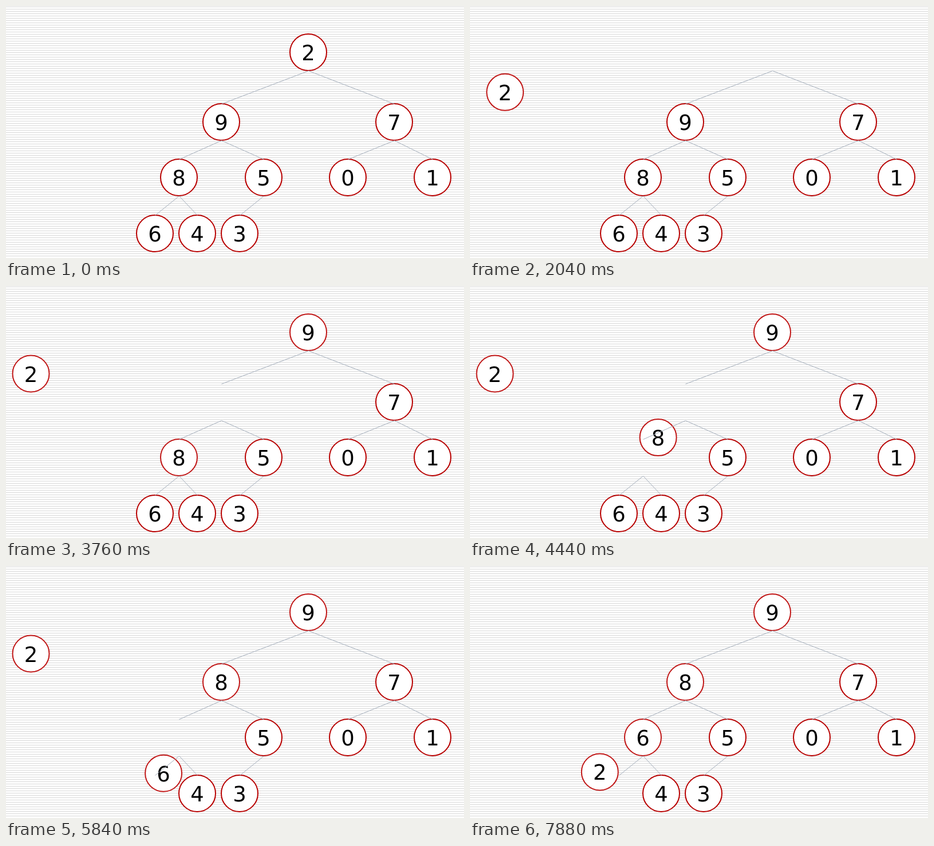
Recreate the animation shown at these times as an HTML page. Size 800 by 441 pixels, loop 8 s.

```html
<!DOCTYPE html>
<html lang="en">
<head>
<meta charset="utf-8">
<title>Heap sift-down</title>
<style>
  html, body { margin: 0; width: 100%; height: 100%; overflow: hidden; background: #fff; }
  svg { display: block; width: 100%; height: 100%; }
  circle { fill: #fff; stroke: #b80000; stroke-width: 2; }
  .moved circle { stroke: #c01616; }
  text {
    font: 37px Verdana, "DejaVu Sans", sans-serif; text-anchor: middle;
    text-rendering: geometricPrecision; fill: #000;
  }
  line { stroke: #a5afbc; stroke-width: 1; }
</style>
</head>
<body>
<svg viewBox="0 0 800 441">
  <defs>
    <pattern id="rules" width="8" height="4" patternUnits="userSpaceOnUse">
      <rect y="1" width="8" height="1" fill="#d8d8d8"/>
    </pattern>
  </defs>
  <rect width="800" height="441" fill="url(#rules)"/>
  <g id="nodes"></g>
  <g id="edges"></g>
</svg>
<script>
const LOOP = 8000;
const FRAME = 40;         // time grid on which the picture may change
const BEAT = 343.2;       // spacing of the visible steps
const FIRST_BEAT = 693.2;
const R = 32;

// Heap in array order: slot i has children 2i+1 and 2i+2
const values = [2, 9, 7, 8, 5, 0, 1, 6, 4, 3];
const columns = [528, 376, 678, 302, 450, 597, 745, 260, 334, 408];
const rows = [81, 203, 300, 398];
const slots = columns.map((x, i) => [x, rows[Math.floor(Math.log2(i + 1))]]);
const aside = [43.5, 153.5];

const swing = p => (1 - Math.cos(Math.PI * p)) / 2;
const surge = p => p * p * (1.88 - 0.88 * p);

// The root steps aside, larger children rise one by one, then it drops in.
// Start and length are in beats.
const legs = [{ value: 2, to: aside, start: -0.3, length: 4.9, ease: swing }];
[9, 8, 6].forEach((value, i) => {
  legs.push({ value, to: slots[2 ** i - 1], start: 5 + 4 * i, length: 4, ease: surge });
});
legs.push({ value: 2, to: slots[7], start: 17.43, length: 4.8, ease: swing });

function add(parent, tag, attrs = {}) {
  const el = document.createElementNS('http://www.w3.org/2000/svg', tag);
  for (const key in attrs) el.setAttribute(key, attrs[key]);
  return parent.appendChild(el);
}

const nodeLayer = document.getElementById('nodes');
const edgeLayer = document.getElementById('edges');

const nodes = values.map((value, i) => {
  const el = add(nodeLayer, 'g');
  add(el, 'circle', { r: R });
  add(el, 'text', { y: 14 }).textContent = value;
  if (i > 0) {
    const [px, py] = slots[(i - 1) >> 1];
    const [x, y] = slots[i];
    add(edgeLayer, 'line', { x1: px + 0.5, y1: py + R + 0.5, x2: x + 0.5, y2: y - R + 0.5 });
  }
  return { value, el, home: slots[i] };
});
nodeLayer.append(nodes[0].el);

// Index of the latest beat shown at time t
function beatAt(t) {
  const frameEnd = (Math.floor(t / FRAME) + 1) * FRAME;
  return Math.ceil((frameEnd - FIRST_BEAT) / BEAT) - 1;
}

function draw(t) {
  const beat = beatAt(t);
  for (const { value, el, home } of nodes) {
    const done = legs.filter(leg => leg.value === value && leg.start <= beat);
    let [x, y] = home;
    for (const { to, start, length, ease } of done) {
      const k = ease(Math.min(1, (beat - start) / length));
      x += (to[0] - x) * k;
      y += (to[1] - y) * k;
    }
    el.setAttribute('transform', `translate(${x.toFixed(2)} ${y.toFixed(2)})`);
    el.classList.toggle('moved', done.length > 0);
  }
}

const begin = performance.now();
function tick() {
  draw((performance.now() - begin) % LOOP);
  requestAnimationFrame(tick);
}
tick();
</script>
</body>
</html>
```
